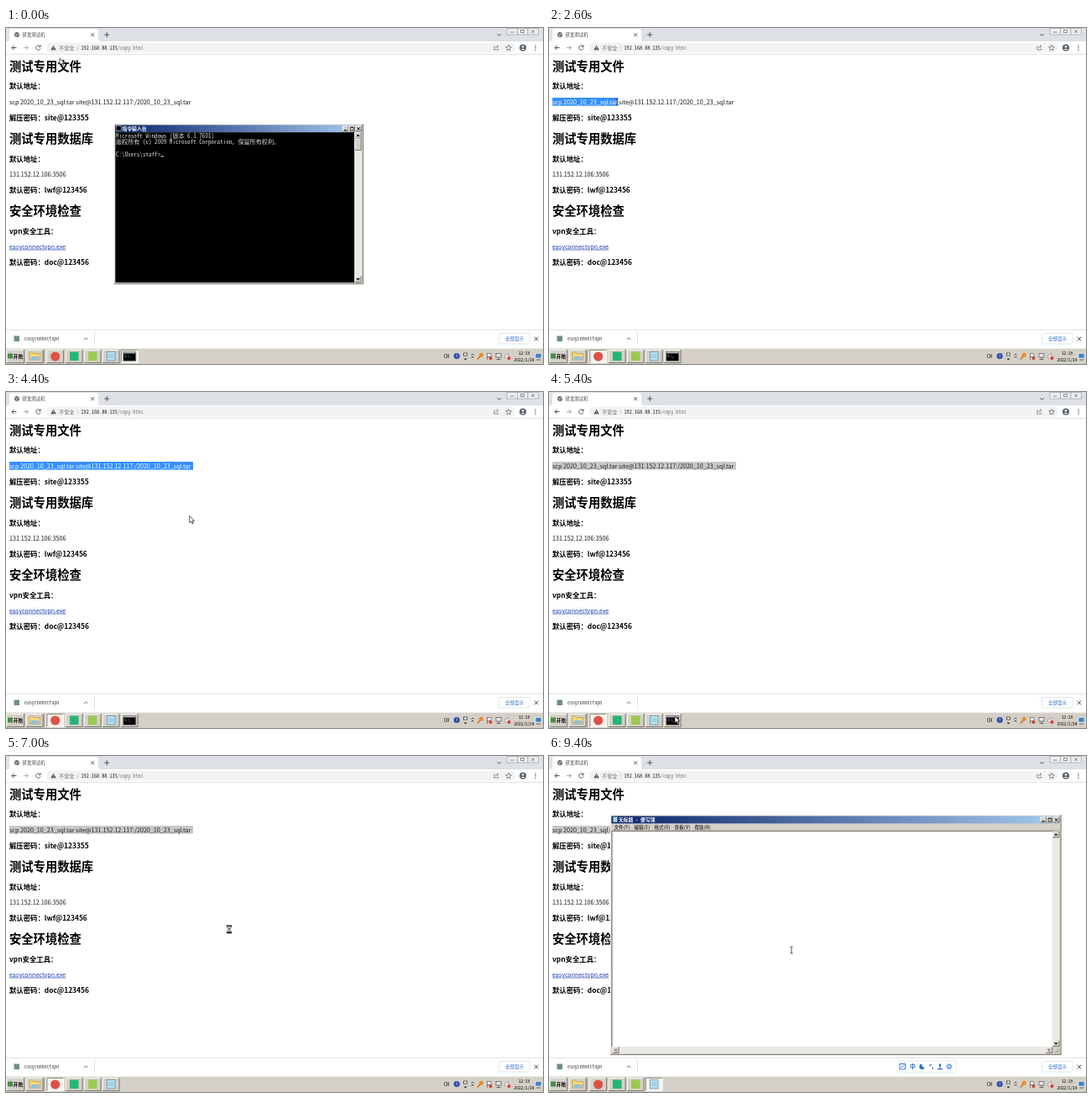
Recreate the animation shown at these times as an HTML page. Size 640 px wide and 400 px high, loop 9.6 s.

```html
<!DOCTYPE html>
<html lang="zh-CN">
<head>
<meta charset="utf-8">
<style>
html, body { margin: 0; width: 100%; height: 100%; overflow: hidden; background: #fff; }
svg { display: block; width: 640px; height: 400px; }
text { font-family: "Noto Sans CJK SC", "Noto Sans", sans-serif; white-space: pre; }
.m { font-family: "Noto Sans Mono CJK SC", "Noto Sans CJK SC", monospace; }
</style>
</head>
<body>
<svg id="stage" viewBox="0 0 640 400"></svg>
<script>
const LOOP = 9600, TICK = 200;
const FACE = '#d4d0c8';

const R = (x, y, w, h, fill, more = '') =>
  `<rect x="${x}" y="${y}" width="${w}" height="${h}" fill="${fill}" ${more}/>`;
const P = (d, stroke, w = .8, fill = 'none') =>
  `<path d="${d}" stroke="${stroke}" stroke-width="${w}" fill="${fill}"/>`;
const C = (x, y, r, fill, more = '') => `<circle cx="${x}" cy="${y}" r="${r}" fill="${fill}" ${more}/>`;
// text placed by its left edge and vertical centre
const T = (x, cy, size, str, fill = '#000', more = '') =>
  `<text x="${x}" y="${(cy + size * .37).toFixed(2)}" font-size="${size}" fill="${fill}" ${more}>${str}</text>`;
const M = (x, cy, size, str, fill = '#000', more = '') => T(x, cy, size, str, fill, 'class="m" ' + more);
const G = (id, body) => `<g id="${id}">${body}</g>`;

function bevel(x, y, w, h, fill = FACE, down = false) {
  const [a, b] = down ? ['#77736c', '#fff'] : ['#fff', '#605d58'];
  return R(x, y, w, h, fill) +
    P(`M${x + .4} ${y + h}V${y + .4}H${x + w}`, a) +
    P(`M${x} ${y + h - .4}H${x + w - .4}V${y}`, b);
}

const arrows = {
  up: (x, y) => P(`M${x - 2} ${y + 1}h4l-2-2.4z`, 'none', 0, '#000'),
  down: (x, y) => P(`M${x - 2} ${y - 1}h4l-2 2.4z`, 'none', 0, '#000'),
  left: (x, y) => P(`M${x + 1} ${y - 2}v4l-2.4-2z`, 'none', 0, '#777'),
  right: (x, y) => P(`M${x - 1} ${y - 2}v4l2.4-2z`, 'none', 0, '#777')
};
const scrollBtn = (x, y, dir) => bevel(x, y, 8, 7.5) + arrows[dir](x + 4, y + 3.8);

function frame(x, y, w, h, title) {
  const r = x + w;
  return bevel(x, y, w, h) +
    R(x + 1.5, y + 1.5, w - 3, 8.8, 'url(#bar)') +
    M(x + 10, y + 6, 5.8, title, '#fff', 'font-weight="700"') +
    [25, 17.5, 9.5].map(d => bevel(r - d, y + 2.4, 7.4, 7)).join('') +
    P(`M${r - 23} ${y + 7.7}h3`, '#000', 1) +
    P(`M${r - 15.6} ${y + 4}h3.8v3.8h-3.8zM${r - 15.6} ${y + 4.4}h3.8`, '#000', .6) +
    P(`M${r - 7.6} ${y + 4.2}l3.4 3.4m0-3.4l-3.4 3.4`, '#000', .9);
}

const COMMAND = 'scp 2020_10_23_sql.tar site@131.152.12.117:/2020_10_23_sql.tar';
const h1 = (y, s) => T(4, y, 14.3, s, '#000', 'font-weight="700"');
const h3 = (y, s) => T(4, y, 8.37, s, '#000', 'font-weight="700"');
const p = (y, s, fill = '#111', more) => T(4, y, 7.15, s, fill, more);

const browser =
  R(0, 0, 640, 400, '#fff') + R(0, 0, 640, 16, '#dee1e6') +
  P('M1 16q3 0 3-3V4q0-3 3-3H107q3 0 3 3v9q0 3 3 3z', 'none', 0, '#fff') +
  C(13, 8, 3, '#5f6368') + P('M10.6 7.2q2 1.6 3 0t2 1M11.5 10l2-1.2', '#fff', .7) +
  M(19.5, 8, 5.4, '研发测试机', '#444') +
  P('M101 5.8l4.4 4.4m0-4.4l-4.4 4.4', '#444', .8) +
  P('M117.2 8h6m-3-3v6', '#444', .9) +
  P('M585.5 7l2.2 2.2l2.2-2.2', '#444', .9) +
  [597, 609.5, 622].map(x => R(x, .4, 12.5, 7.6, '#eceef0', 'stroke="#a2a6ac" stroke-width=".7"')).join('') +
  P('M601 5h4.5M613.5 2.5h4v3h-4zM626 2.3l4 3.6m0-3.6l-4 3.6', '#777', .8) +
  P('M12.5 23.5H7m2.6-2.7L7 23.5l2.6 2.7', '#4a4d51', 1) +
  P('M21 23.5h5.5m-2.6-2.7l2.6 2.7l-2.6 2.7', '#a5a8ac', 1) +
  P('M40.6 21.8a2.7 2.7 0 1 0 .4 2.4M41.2 20.2v2.2h-2.3', '#4a4d51', .9) +
  R(48, 17.6, 559, 11.8, '#f1f3f4', 'rx="5.9"') +
  P('M56.5 20.4l3.3 5.8h-6.6z', 'none', 0, '#55585c') + P('M56.5 22.3v1.8m0 .7v.8', '#fff', .6) +
  M(63, 23.5, 6.2, '不安全', '#666') + P('M85.5 20.5v6', '#b5b8bc', .6) +
  M(89.5, 23.5, 6.2, '192.168.88.135<tspan fill="#777">/copy.html</tspan>', '#222') +
  P('M583 22h-1.2v4h5v-1.4m-3-.6q.3-2 2.6-2.2m-1.2-1.5l1.7 1.5l-1.7 1.5', '#666', .7) +
  P('M599 20.3l1 2.1 2.3.3-1.7 1.6.4 2.3-2-1.1-2 1.1.4-2.3-1.7-1.6 2.3-.3z', '#555', .7) +
  C(616, 23.5, 4, '#55606e') + C(616, 22.3, 1.3, '#fff') + P('M613.5 26q2.5-2.6 5 0z', 'none', 0, '#fff') +
  [21, 23.5, 26].map(y => C(631, y, .7, '#444')).join('') +
  P('M0 31.3H640', '#d5d7da', .8) +
  h1(46, '测试专用文件') + h3(69.3, '默认地址：') + p(88, COMMAND) + h3(106.5, '解压密码：site@123355') +
  h1(132, '测试专用数据库') + h3(155.5, '默认地址：') + p(174, '131.152.12.106:3506') + h3(192.5, '默认密码：lwf@123456') +
  h1(218, '安全环境检查') + h3(241.5, 'vpn安全工具：') +
  p(260, 'easyconnectvpn.exe', '#1a3fb5', 'text-decoration="underline"') + h3(279, '默认密码：doc@123456') +
  G('sel', R(4, 83, 219, 9.6, '#3390ff', 'id="selBox"') + p(88, COMMAND, '#fff', 'id="selText"')) +
  P('M0 359.3H640', '#d5d7da', .8) + R(9.5, 366.5, 6.5, 6.5, '#6f8f86') +
  M(22, 370, 5.9, 'easyconnectvpn', '#444') +
  P('M93 371l2.2-2.2l2.2 2.2', '#555', .8) + P('M105.5 361.5v17', '#d5d7da', .7) +
  R(587.5, 363.5, 36.5, 12.5, '#fff', 'rx="1.5" stroke="#d5d8dc" stroke-width=".7"') +
  M(595, 369.8, 5.5, '全部显示', '#2269c4') + P('M629.8 367.6l4.6 4.6m0-4.6l-4.6 4.6', '#444', .9);

const task = (id, x, icon) => G(id,
  G(id + 'Off', bevel(x, 383, 20.5, 16)) + G(id + 'On', bevel(x, 383, 20.5, 16, '#f3f1ec', true)) + icon);
const page = (x, y, w, h) =>
  R(x, y, w, h, '#b9e2f2', 'stroke="#3f7f9b" stroke-width=".6"') +
  P(`M${x + 1.5} ${y + h * .35}h${w - 3}m${3 - w} ${h * .25}h${w - 3}`, '#5a9ab5', .6);

const taskbar =
  R(0, 381, 640, 19, FACE) + P('M0 381.6H640', '#f6f5f2', .9) +
  bevel(.5, 383, 21.5, 16) + R(2, 387.5, 6, 6, '#4c8a4a') + M(8.8, 391, 5.6, '开始', '#000', 'font-weight="700"') +
  task('files', 24, P('M28 395v-9h4l1.5 1.5h7V395z', '#b28a2e', .6, '#f5d676') + R(30, 391, 9, 4, '#8fc0e2')) +
  P('M45.6 383.5v15', '#7d7972', .7) + P('M47 383.5v15', '#fff', .7) +
  task('web', 48.5, C(58.7, 391, 5.6, '#de5246')) +
  task('ide', 71, R(76, 385.5, 10.5, 10.5, '#24b574')) +
  task('edit', 93, R(98, 385.5, 10.5, 10.5, '#9bc953')) +
  task('note', 115, page(120.5, 385.5, 9.5, 10.5)) +
  task('term', 137, R(139.8, 385.3, 15, 11, '#000', 'stroke="#8c8c8c" stroke-width=".7"') +
    R(140.2, 385.6, 14.2, 1.8, '#b9bcc0') + M(141.5, 390.5, 4, 'C:\\_', '#fff')) +
  M(522, 391, 5.8, 'CH', '#000') + C(537.2, 390.5, 3.6, '#2b50a8') + M(535.8, 390.5, 5.5, '?', '#fff') +
  R(545.5, 387, 4, 3, '#fff', 'stroke="#222" stroke-width=".7"') + P('M545.5 393.5h4l-2 2z', 'none', 0, '#222') +
  P('M554.5 389.5l1.5-1.5l1.5 1.5m-3 3l1.5-1.5l1.5 1.5', '#222', .8) +
  C(566.3, 389.3, 2.5, '#f08a24') + P('M565 391l-3.2 3.5', '#d86b14', 1.5) +
  P('M573.5 387v8m0-7.5h4.5v4h-4.5', '#666', .8, '#fff') + C(577.5, 393, 2, '#d93a32') +
  R(584, 387.5, 6, 4.5, '#dfe8ee', 'stroke="#555" stroke-width=".7"') + P('M587 392v2.5m-2.5 0h5', '#555', .8) +
  P('M594.5 389.5h1.8l2.4-2.3v7.6l-2.4-2.3h-1.8z', '#777', .5, '#eee') + C(599.5, 393, 2, '#d93a32') +
  M(617.5, 387, 5.3, '12:19', '#000', 'text-anchor="middle"') +
  M(617.5, 395, 5.3, '2022/1/24', '#000', 'text-anchor="middle"') +
  R(631, 387.5, 7, 5.5, '#3f7fc6', 'stroke="#e9eef4" stroke-width=".7"') + P('M632 395h5', '#555', .9);

const line = (n, s) => M(131, 128.6 + n * 7.25, 7.1, s, '#dcdcdc', 'font-weight="500"');
const terminal = frame(128.5, 114, 297.5, 191, '指令输入台') +
  R(131.2, 116.4, 6, 6, '#000', 'stroke="#bbb" stroke-width=".7"') +
  R(130.3, 124.2, 285, 178.8, '#000') + R(415.3, 124.2, 8.7, 178.8, '#ebe9e4') +
  scrollBtn(415.6, 124.2, 'up') + bevel(415.6, 131.8, 8, 14) + scrollBtn(415.6, 295.3, 'down') +
  line(0, 'Microsoft Windows [版本 6.1.7601]') +
  line(1, '版权所有 (c) 2009 Microsoft Corporation。保留所有权利。') +
  line(3, 'C:\\Users\\staff&gt;') + R(184.5, 152.4, 3.5, 1, '#eee');

const menu = bevel(252, 186, 62.5, 51) + R(253.5, 203.3, 59.5, 8.2, '#0a246a', 'id="hot"') +
  ['标记(K)', '复制(Y)', '粘贴(P)', '全选(S)', '滚动(L)', '查找(F)...'].map((s, i) =>
    M(261, 191.3 + 8 * i, 5.4, s, i == 1 ? '#918d86' : '#000', i == 2 ? 'id="paste"' : '')).join('') +
  M(291, 199.3, 5.4, 'Enter', '#918d86');

const notepad = frame(73, 70, 537.5, 286, '无标题 - 便写簿') + page(76.3, 72.6, 5, 6.2) +
  ['文件(F)', '编辑(E)', '格式(O)', '查看(V)', '帮助(H)'].map((s, i) => M(77.5 + 24 * i, 84.8, 5.5, s)).join('') +
  R(75, 89.3, 525, 256.8, '#fff') + P('M75 346V89.3H608', '#55524d', .9) +
  R(600.2, 89.8, 8, 256.5, '#ebe9e4') + R(75.5, 346.2, 524.7, 8, '#ebe9e4') +
  scrollBtn(600.2, 89.8, 'up') + scrollBtn(600.2, 338.6, 'down') +
  scrollBtn(75.5, 346.4, 'left') + scrollBtn(592.2, 346.4, 'right') +
  P('M602.5 354l5.5-5.5m-3 5.5l3-3', '#8a867e', .8);

const BLUE = '#2b6fd6';
const ime = R(415, 363, 70, 13.5, '#fff', 'rx="1.5" stroke="#dbe1ea" stroke-width=".7"') +
  R(418, 366.5, 6.5, 6.5, 'none', `stroke="${BLUE}" stroke-width=".9"`) + P('M419.5 371.5l3.5-3.5', BLUE, 1) +
  T(430, 369.8, 7, '中', BLUE, 'font-weight="700"') +
  P('M444.5 366.5a3.3 3.3 0 1 0 3.2 4.5a3.5 3.5 0 0 1-3.2-4.5', 'none', 0, BLUE) +
  C(454.5, 368, 1.1, 'none', `stroke="${BLUE}" stroke-width=".8"`) + P('M457.5 370.5v1l-1 1.4', BLUE, 1.1) +
  C(466, 368, 1.4, BLUE) + P('M463 372.6h6M466 369v3', BLUE, 1.1) +
  C(477, 369.7, 2, 'none', `stroke="${BLUE}" stroke-width="1"`) +
  C(477, 369.7, 3, 'none', `stroke="${BLUE}" stroke-width="1" stroke-dasharray="1.2 1.156"`);

const pointer =
  G('arrow', P('M0 0V8l1.9-1.7 1.3 3 1.4-.6-1.3-2.9h2.5z', '#111', .7, '#fff')) +
  G('beam', P('M-1.6-4q1.6 0 1.6 .8V3.2q0 .8-1.6 .8M1.6-4q-1.6 0-1.6 .8M1.6 4q-1.6 0-1.6-.8', '#222', .8)) +
  G('wait', P('M-2.3-4V-2.5L-.5 0L-2.3 2.5V4H2.3V2.5L.5 0L2.3-2.5V-4z', '#111', .8, '#fff') +
    P('M-3.2-4.2h6.4M-3.2 4.2h6.4', '#111', 1.2) + P('M-1.5 3.6L0 1.6l1.5 2zM-1-2h2L0-.6z', 'none', 0, '#111'));

const stage = document.getElementById('stage');
stage.innerHTML = `<defs>
  <linearGradient id="bar"><stop stop-color="#0a246a"/><stop offset="1" stop-color="#a6caf0"/></linearGradient>
  <clipPath id="cut"><rect id="cutBox" x="4" y="80" width="0" height="16"/></clipPath></defs>` +
  browser + G('terminal', terminal) + G('menu', menu) + G('notepad', notepad) + G('ime', ime) + taskbar + G('pointer', pointer);

const $ = id => document.getElementById(id);
const show = (id, on) => $(id).style.display = on ? '' : 'none';
$('sel').setAttribute('clip-path', 'url(#cut)');

// pointer path: time, x, y
const path = [
  [0, 64, 36], [200, 64, 36], [1200, 51, 95], [2000, 51, 95], [2200, 4, 88], [3400, 236, 88], [4200, 236, 88],
  [5200, 150, 386], [5400, 150, 386], [6000, 252, 187], [6400, 266, 206], [8200, 266, 207],
  [8800, 123, 386], [9000, 123, 386], [9400, 289, 231], [LOOP, 289, 231]
];
function pointerAt(t) {
  const i = path.findIndex(k => k[0] > t), [t0, x0, y0] = path[i - 1], [t1, x1, y1] = path[i];
  const u = (t - t0) / (t1 - t0);
  return [x0 + (x1 - x0) * u, y0 + (y1 - y0) * u];
}

function draw(now) {
  const t = Math.floor(now % LOOP / TICK) * TICK;
  const within = (a, b) => t >= a && t < b;
  const [x, y] = pointerAt(t);

  const dragging = within(2200, 3400), wait = within(6800, 8400);
  const beam = dragging || t >= 9400;
  $('pointer').setAttribute('transform', `translate(${x} ${y})`);
  show('arrow', !beam && !wait);
  show('beam', beam);
  show('wait', wait);

  const width = t < 2200 ? 0 : dragging ? Math.min(x - 4, 219) : 219;
  $('cutBox').setAttribute('width', width);
  $('selBox').setAttribute('fill', t < 5400 ? '#3390ff' : '#c8c8c8');
  $('selText').setAttribute('fill', t < 5400 ? '#fff' : '#222');

  const term = t < 200 || within(5600, 6800), note = t >= 9000;
  show('terminal', term);
  show('menu', within(6000, 6600));
  show('hot', t >= 6400);
  $('paste').setAttribute('fill', t >= 6400 ? '#fff' : '#000');
  show('notepad', note);
  show('ime', note);
  show('term', t < 6800);

  const active = term ? 'term' : note ? 'note' : 'web';
  for (const id of ['files', 'web', 'ide', 'edit', 'note', 'term']) {
    show(id + 'On', id == active);
    show(id + 'Off', id != active);
  }
}

const start = performance.now();
function loop() {
  draw(performance.now() - start);
  requestAnimationFrame(loop);
}
loop();
</script>
</body>
</html>
```
